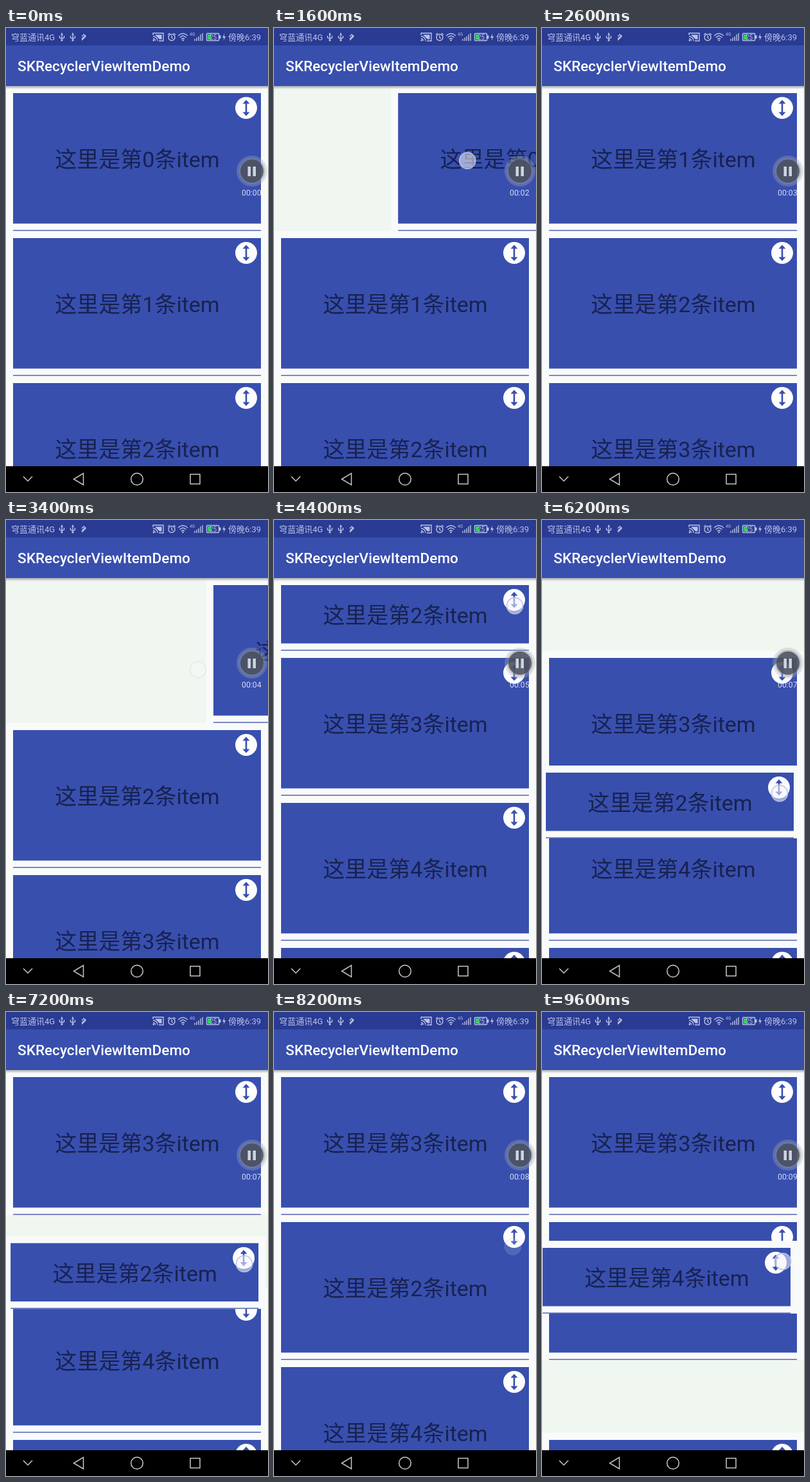
Write an HTML page that moves like this. It is 408x720 px and loops after 9800 ms.

```html
<!DOCTYPE html>
<html lang="zh">
<head>
<meta charset="utf-8">
<title>SKRecyclerViewItemDemo</title>
<style>
  html, body { margin: 0; width: 100%; height: 100%; overflow: hidden; background: #f0f7f0; }
  svg { display: block; width: 408px; height: 720px; }
  text { font-family: Roboto, "Noto Sans CJK SC", "Noto Sans CJK", sans-serif; }
  .label { font-size: 34px; fill: #182250; text-anchor: middle; }
  .status { font-size: 13px; fill: #bac2e8; }
  .icon { fill: none; stroke: #bac2e8; stroke-width: 1.4; }
  .solid { fill: #bac2e8; stroke: none; }
  .nav { fill: none; stroke: #c4c8cc; stroke-width: 1.5; }
</style>
</head>
<body>
<svg viewBox="0 0 408 720">
  <defs>
    <linearGradient id="shade" x2="0" y2="1">
      <stop stop-color="#707780" stop-opacity=".6"/>
      <stop offset="1" stop-color="#707780" stop-opacity="0"/>
    </linearGradient>
    <g id="handle">
      <circle r="17" fill="#fdfdfe"/>
      <path d="M0-9V9" stroke="#384fae" stroke-width="2.6"/>
      <path d="M0-12.5L5.5-6.5H-5.5ZM0 12.5L5.5 6.5H-5.5Z" fill="#384fae"/>
    </g>
    <g id="usb">
      <path class="icon" d="M0-5V5M-3.5-2V1L0 3L3.5 1V-2"/>
      <path class="solid" d="M0-7L2-3.5H-2Z"/>
      <circle class="solid" cy="5" r="1.6"/>
    </g>
  </defs>

  <rect width="408" height="720" fill="#f0f7f0"/>
  <g id="list"></g>

  <rect y="90" width="408" height="5" fill="url(#shade)"/>
  <rect y="27" width="408" height="63" fill="#384fae"/>
  <rect width="408" height="27" fill="#293b92"/>
  <text x="18" y="67" font-size="22.6" font-weight="500" fill="#fff">SKRecyclerViewItemDemo</text>

  <text class="status" x="8" y="19">穹蓝通讯4G</text>
  <use href="#usb" x="87" y="14"/>
  <use href="#usb" x="104" y="14"/>
  <path class="icon" d="M118 17L124 11M118 13L121 10L124 13L121 16L118 19"/>
  <path class="icon" d="M229 11V8H245V20H238M229 13A7 7 0 0 1 236 20M229 16.5A3.5 3.5 0 0 1 232.5 20"/>
  <path class="solid" d="M232 10.5H242.5V17.5H239Z"/>
  <circle class="solid" cx="229.8" cy="19.3" r="1.2"/>
  <circle class="icon" cx="258" cy="14.5" r="5"/>
  <path class="icon" d="M258 11.5V15L260 16.5M252 10.5L255 8M264 10.5L261 8"/>
  <path class="icon" d="M268 12Q275.5 5 283 12M270.5 14.7Q275.5 10 280.5 14.7M273 17.2Q275.5 15 278 17.2"/>
  <circle class="solid" cx="275.5" cy="19" r="1.3"/>
  <text class="status" x="286" y="12" style="font-size:6.5px">4G</text>
  <path class="icon" d="M294 20V17M297 20V15M300 20V13M303 20V10M306 20V8"/>
  <rect class="icon" x="312.5" y="8.5" width="19" height="11" rx="1"/>
  <path class="solid" d="M332 11.5H334.5V16.5H332Z"/>
  <rect x="314" y="10" width="5.5" height="8" fill="#2fd05c"/>
  <text class="status" x="317" y="18" style="font-size:10px">25</text>
  <path class="solid" d="M340.5 8L337 15H339.5L338.5 20L342 13H339.5Z"/>
  <text class="status" x="346" y="19">傍晚6:39</text>

  <circle cx="383" cy="222" r="24" fill="#a4acb8" fill-opacity=".32"/>
  <circle cx="383" cy="222" r="20.5" fill="#858c96" fill-opacity=".38"/>
  <circle cx="383" cy="222" r="18" fill="#454a57" fill-opacity=".8"/>
  <path d="M376.5 215H381V230H376.5ZM384.5 215H389V230H384.5Z" fill="#ccd4de"/>
  <text id="clock" x="367" y="260" font-size="12.3" fill="#fff" fill-opacity=".78"></text>

  <circle id="touch" r="12.5" fill="#f2f4fb" fill-opacity=".62" stroke="#bcc5e8" stroke-width="1.8"/>

  <rect y="680" width="408" height="40" fill="#000"/>
  <path class="nav" d="M27 696L34 703L41 696M120.5 691V709L105.5 700Z"/>
  <circle class="nav" cx="204" cy="700" r="9.3"/>
  <rect class="nav" x="287" y="692.5" width="15" height="15"/>
</svg>

<script>
const LOOP = 9800, STEP = 200;
const WIDTH = 408, TOP = 90, FULL = 225, SMALL = 113;
const FLING = 400, SETTLE = 400, LIFT = 200;
const SWAP = 6200;

// The finger passes the points of its path at an even pace.
const gestures = [
  { row: 0, kind: 'swipe', from: 1000, to: 1800, path: [[119, 205], [362, 206]] },
  { row: 1, kind: 'swipe', from: 2800, to: 3200, path: [[83, 228], [299, 232]] },
  { row: 2, kind: 'drag', from: 4400, to: 8000, path: [[375, 133], [370, 424], [372, 364]] },
  { row: 4, kind: 'drag', from: 9000, to: 9600, path: [[385, 572], [375, 387]], held: true }
];

const mix = (a, b, p) => a + (b - a) * p;
const ramp = (t, from, length) => Math.min(1, Math.max(0, (t - from) / length));
const $ = id => document.getElementById(id);
const list = $('list'), dot = $('touch'), clock = $('clock');

function add(parent, name, attrs) {
  const el = document.createElementNS('http://www.w3.org/2000/svg', name);
  for (const k in attrs) el.setAttribute(k, attrs[k]);
  return parent.appendChild(el);
}

const rows = Array.from({ length: 6 }, (_, i) => {
  const g = add(list, 'g');
  const row = {
    g,
    gesture: gestures.find(e => e.row === i),
    back: add(g, 'rect', { width: WIDTH, fill: '#f9fafa' }),
    block: add(g, 'rect', { x: 11, y: 11, width: 386, fill: '#384fae' }),
    line: add(g, 'rect', { x: 11, width: 386, height: 1.3, fill: '#384fae' }),
    label: add(g, 'text', { x: 204.5, class: 'label' })
  };
  row.label.textContent = `这里是第${i}条item`;
  add(g, 'use', { href: '#handle', x: 374, y: 34 });
  return row;
});

function finger({ path, from, to }, t) {
  const u = ramp(t, from, to - from) * (path.length - 1);
  const i = Math.min(Math.floor(u), path.length - 2);
  return [0, 1].map(k => mix(path[i][k], path[i + 1][k], u - i));
}

function pose({ gesture: e }, t) {
  const p = { x: 0, dy: 0, h: FULL, space: FULL, home: 1 };
  if (!e) return p;
  const [x, y] = finger(e, t);
  const dx = x - e.path[0][0];
  if (e.kind === 'swipe') {
    p.x = mix(dx, WIDTH, ramp(t, e.to, FLING));
    p.space *= 1 - ramp(t, e.to + FLING, SETTLE);
  } else {
    p.home = e.held ? 0 : ramp(t, e.to, LIFT);
    p.x = dx * (1 - p.home);
    p.dy = y - e.path[0][1];
    p.lift = ramp(t, e.from - LIFT, LIFT) * (1 - p.home);
    p.h = p.space = mix(FULL, SMALL, p.lift);
  }
  return p;
}

function place(row, { x, y, h, lift }) {
  row.g.setAttribute('transform', `translate(${x} ${TOP + y})`);
  row.back.setAttribute('height', h);
  row.block.setAttribute('height', h - 22.5);
  row.line.setAttribute('y', h - 1.5);
  row.label.setAttribute('y', h / 2 + 13.8);
  if (lift && list.lastChild !== row.g) list.append(row.g);
}

function drawRows(t) {
  const poses = rows.map(row => pose(row, t));
  const swap = ramp(t, SWAP, SETTLE);
  let slot = 0;
  poses.forEach((p, i) => {
    let rest = slot;
    if (i === 2) rest += swap * FULL;
    if (i === 3) rest -= swap * poses[2].space;
    p.y = mix(slot + p.dy, rest, p.home);
    slot += p.space;
    place(rows[i], p);
  });
}

function drawTouch(t) {
  const e = gestures.findLast(e => t >= e.from - LIFT) || gestures[0];
  const [x, y] = finger(e, t);
  const fade = e.held ? 0 : ramp(t, e.to, FLING);
  dot.setAttribute('transform', `translate(${x} ${y})`);
  dot.setAttribute('opacity', .9 * ramp(t, e.from - LIFT, LIFT) * (1 - fade) ** 2);
}

function draw(now) {
  const t = Math.floor(now % LOOP / STEP) * STEP;
  const s = t / 1000;
  drawRows(t);
  drawTouch(t);
  // The recorder's clock runs slightly slower towards the end.
  clock.textContent = '00:0' + Math.floor(.95 + s * (1.12 - .02 * s));
}

const start = performance.now();
function tick() {
  draw(performance.now() - start);
  requestAnimationFrame(tick);
}
tick();
</script>
</body>
</html>
```
